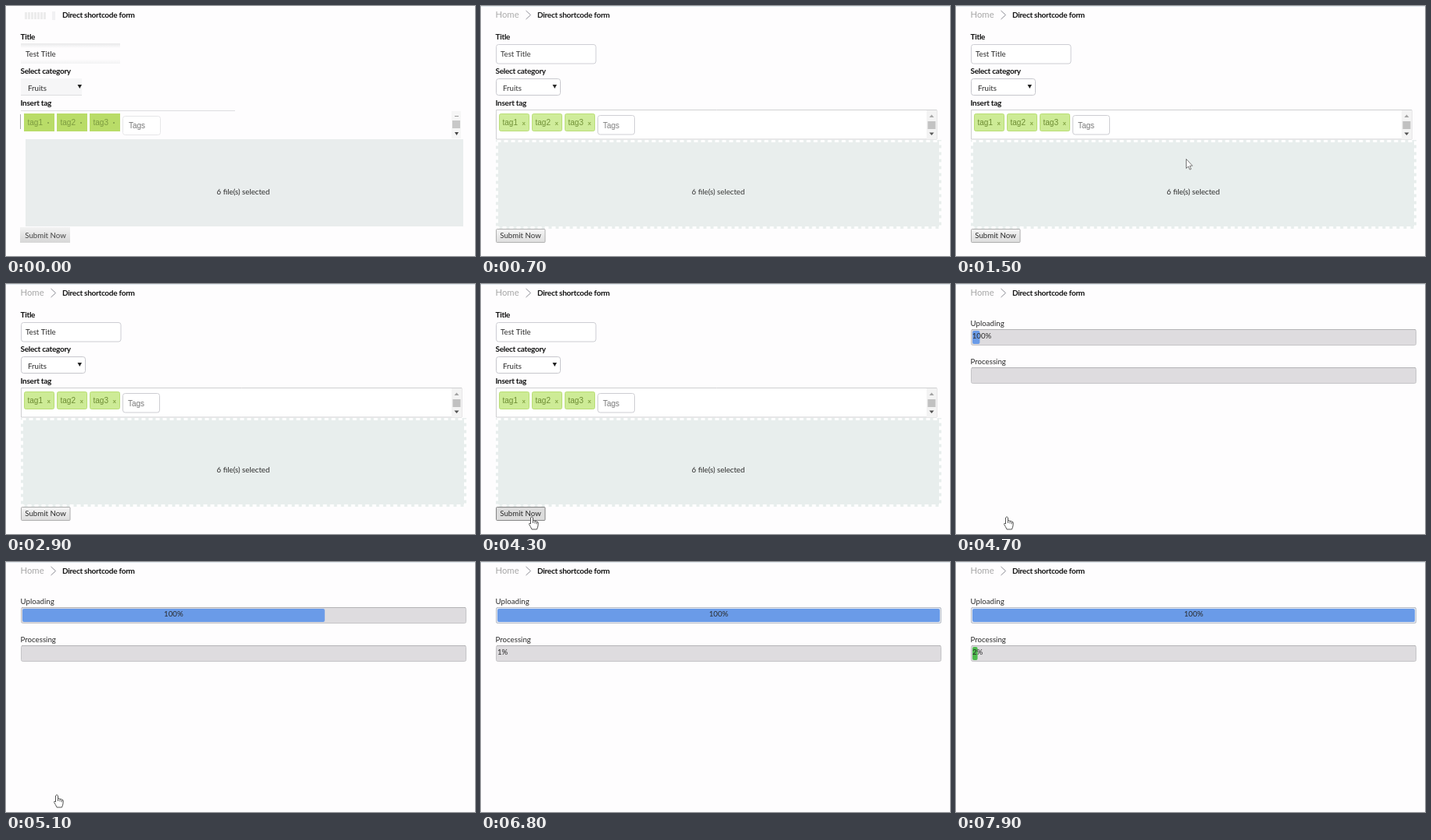
An HTML page with a canvas for the animation above (8 s loop, 600 by 321 pixels).

```html
<!DOCTYPE html>
<html lang="en">
<head>
<meta charset="utf-8">
<title>Upload form</title>
<style>
html, body { margin: 0; width: 100%; height: 100%; overflow: hidden; background: #fefdfe; }
canvas { display: block; width: 600px; height: 321px; }
</style>
</head>
<body>
<canvas id="stage" width="600" height="321"></canvas>
<script>
const ctx = document.getElementById('stage').getContext('2d');
const LOOP = 8000, STEP = 100;
const PAGE = '#fefdfe', INK = '#2a2a2a', ZONE = '#e8eeed';
const BODY = '9.7px Lato, sans-serif';
const BOLD = 'bold 10px Lato, sans-serif';
const FIELD = '10px "Liberation Sans", Arial, sans-serif';

const clamp = v => Math.max(0, Math.min(1, v));
const ramp = (t, from, to) => clamp((t - from) / (to - from));

function text(str, x, y, font = BODY, color = INK, align = 'left') {
  ctx.font = font;
  ctx.letterSpacing = font === BOLD ? '-0.27px' : '0px';
  ctx.fillStyle = color;
  ctx.textAlign = align;
  ctx.fillText(str, x, y);
}

function rect(x, y, w, h, fill) {
  ctx.fillStyle = fill;
  ctx.fillRect(x, y, w, h);
}

function box(x, y, w, h, r, fill, line) {
  ctx.beginPath();
  ctx.roundRect(x + 0.5, y + 0.5, w - 1, h - 1, r);
  ctx.fillStyle = fill;
  ctx.fill();
  if (!line) return;
  ctx.strokeStyle = line;
  ctx.lineWidth = 1;
  ctx.stroke();
}

function poly(points, fill, line) {
  ctx.beginPath();
  points.forEach(([x, y]) => ctx.lineTo(x, y));
  ctx.closePath();
  ctx.fillStyle = fill;
  ctx.fill();
  if (!line) return;
  ctx.strokeStyle = line;
  ctx.lineWidth = 1;
  ctx.stroke();
}

function shade(y, h, top, bottom) {
  const g = ctx.createLinearGradient(0, y, 0, y + h);
  g.addColorStop(0, top);
  g.addColorStop(1, bottom);
  return g;
}

function header() {
  rect(0, 0, 600, 1, '#dfe8ee');
  text('Home', 18.5, 15, '11.3px Lato, sans-serif', '#a6a6a6');
  ctx.strokeStyle = '#8f8f98';
  ctx.lineWidth = 1;
  ctx.beginPath();
  ctx.moveTo(57.5, 6);
  ctx.lineTo(63.5, 11.5);
  ctx.lineTo(57.5, 17);
  ctx.stroke();
  text('Direct shortcode form', 72, 15, BOLD, '#111');
}

function labels() {
  text('Title', 18.5, 42.5, BOLD, '#111');
  text('Select category', 18.5, 86.5, BOLD, '#111');
  text('Insert tag', 18.5, 127.5, BOLD, '#111');
  text('Test Title', 25, 64.5);
  text('Fruits', 28, 109);
  poly([[91.5, 101], [97, 101], [94.3, 106]], '#222');
}

function dropZone() {
  rect(19, 172, 570, 114, ZONE);
  ctx.strokeStyle = '#fff';
  ctx.lineWidth = 3;
  ctx.setLineDash([5, 4]);
  ctx.strokeRect(20.5, 173.5, 567, 111);
  ctx.setLineDash([]);
}

function scrollbar() {
  rect(570, 134, 13, 37, '#f3f3f3');
  poly([[573.5, 143], [579.5, 143], [576.5, 139.5]], '#a3a3a3');
  rect(571.5, 148, 10, 10, '#c1c1c1');
  poly([[573.5, 162.5], [579.5, 162.5], [576.5, 166]], '#505050');
}

function form(dy, pressed) {
  ctx.save();
  ctx.translate(0, dy);
  box(19, 49, 128.5, 25.5, 3, '#fff', '#cdcdd3');
  box(19, 93, 83, 22, 3, '#fff', '#c6c6cc');
  labels();
  box(19, 133, 564.5, 38.5, 0, '#fff', '#cfcfd1');
  scrollbar();
  for (let i = 0; i < 3; i++) {
    const x = 23 + i * 42;
    box(x, 138, 39, 23, 2, '#cdeb96', '#b9de75');
    text('tag' + (i + 1), x + 4.5, 152.5, FIELD, '#6d8c33');
    text('x', x + 29.5, 152.5, 'bold 8px "Liberation Sans", Arial, sans-serif', '#86a647');
  }
  box(149, 140, 48, 25.5, 3, '#fff', '#cdcdd2');
  text('Tags', 156, 156.5, FIELD, '#777');
  dropZone();
  text('6 file(s) selected', 303.5, 242, BODY, INK, 'center');
  box(19, 286, 63.5, 18, 1, pressed ? '#dcdcdc' : shade(286, 18, '#f6f6f6', '#dcdcdc'),
    pressed ? '#858585' : '#adadad');
  text('Submit Now', 50.5, 298, BODY, INK, 'center');
  ctx.restore();
}

// The form before its picture has sharpened.
function roughForm() {
  for (let x = 24; x < 50; x += 4) rect(x, 8, 3, 9, '#ececec');
  rect(59, 7, 4, 11, '#f1f1f3');
  text('Direct shortcode form', 72, 15, BOLD, '#111');
  rect(19, 48, 127, 6, shade(48, 6, '#e9e9ea', PAGE));
  rect(19, 68, 127, 6, shade(68, 6, PAGE, '#f3f3f4'));
  rect(19, 93, 78, 22, '#f6f6f7');
  rect(19, 114, 78, 1, '#dedee0');
  labels();
  rect(19, 134, 274, 1, '#dddde0');
  rect(18, 139, 1, 19, '#aaa');
  for (let i = 0; i < 3; i++) {
    const x = 23 + i * 42;
    rect(x, 138, 39, 23, '#b9dc68');
    text('tag' + (i + 1), x + 4.5, 153, FIELD, '#7c9b40');
    rect(x + 30, 149, 2, 2, '#8dac50');
  }
  box(149, 141, 49, 25, 3, '#fff', '#e6e6e8');
  text('Tags', 157, 157, FIELD, '#777');
  rect(570, 135, 12, 35, '#f6f6f6');
  rect(571, 147, 10, 10, '#c8c8c8');
  rect(574, 141, 5, 1, '#999');
  poly([[574, 162], [579, 162], [576.5, 166]], '#444');
  rect(25, 171, 560, 112, '#e9eded');
  text('6 file(s) selected', 303.5, 242, BODY, INK, 'center');
  rect(18, 284, 64, 20, shade(284, 20, '#f3f3f3', '#d6d6d6'));
  text('Submit Now', 50.5, 298, BODY, '#444', 'center');
}

function track(label, y) {
  text(label, 18.5, y - 4);
  box(19, y, 570, 21, 2, '#dedcdf', '#c5c4c7');
  rect(20, y, 568, 1, '#b4b3b6');
}

function bar(y, width, fill) {
  if (width < 1) return;
  ctx.beginPath();
  ctx.roundRect(21, y, width, 17, Math.min(2, width / 2));
  ctx.fillStyle = fill;
  ctx.fill();
}

function progress(t) {
  track('Uploading', 58);
  track('Processing', 107);
  if (t >= 4700) {
    const w = 566 * ramp(t, 4690, 5290);
    if (w > 564) box(19, 58, 570, 21, 2, '#e6e9f0', '#b9bfca');
    bar(60, w, '#6a9be8');
    text('100%', 21 + Math.max(w, 24) / 2, 70, BODY, INK, 'center');
  }
  if (t >= 5800) {
    bar(109, 5.66 * (ramp(t, 6700, 7300) + ramp(t, 7800, 8400)), '#4dbb4d');
    text(t < 7800 ? '1%' : '2%', 21, 119);
  }
}

function arrow(x, y) {
  const shape = [[0, 0], [0, 12], [2.7, 9.5], [4.6, 13.6], [6.3, 12.8], [4.5, 8.9], [8, 8.6]];
  poly(shape.map(([a, b]) => [x + a, y + b]), '#fff', '#777');
}

function hand(x, y) {
  ctx.save();
  ctx.translate(x, y);
  ctx.beginPath();
  ctx.moveTo(-1.5, 9);
  ctx.lineTo(-1.5, 1);
  ctx.quadraticCurveTo(0, -1.5, 1.5, 1);
  ctx.lineTo(1.5, 5);
  ctx.quadraticCurveTo(3, 3.8, 4, 5.5);
  ctx.quadraticCurveTo(5.7, 4.5, 6.3, 6.3);
  ctx.quadraticCurveTo(8.3, 5.8, 8.3, 8);
  ctx.quadraticCurveTo(8.3, 12, 6.5, 16);
  ctx.lineTo(0, 16);
  ctx.quadraticCurveTo(-1.5, 12.5, -3.5, 9.5);
  ctx.quadraticCurveTo(-3.5, 7, -1.5, 9);
  ctx.closePath();
  ctx.fillStyle = '#fff';
  ctx.fill();
  ctx.strokeStyle = '#555';
  ctx.lineWidth = 1;
  ctx.stroke();
  ctx.beginPath();
  for (const [px, py] of [[1.5, 5], [4, 5.5], [6.3, 6.3]]) {
    ctx.moveTo(px, py);
    ctx.lineTo(px, py + 3);
  }
  ctx.stroke();
  ctx.restore();
}

// Pointer stops: time, x, y.
const PATH = [
  [1000, 318, 236], [1500, 294.5, 196.5], [1900, 272, 212], [2700, 112, 300],
  [2850, 90, 325], [3000, 80, 322], [3400, 65, 299], [6400, 65, 299]
];

function pointer(t) {
  const i = PATH.findIndex(p => t < p[0]);
  if (i < 1) return;
  const [t0, x0, y0] = PATH[i - 1], [t1, x1, y1] = PATH[i];
  const k = ramp(t, t0, t1);
  const x = x0 + (x1 - x0) * k, y = y0 + (y1 - y0) * k;
  (t < 3300 ? arrow : hand)(x, y);
}

function draw(t) {
  ctx.globalAlpha = 1;
  rect(0, 0, 600, 321, PAGE);
  if (t < 900) {
    roughForm();
    ctx.globalAlpha = 1 - (1 - t / 900) ** 2;
    if (t > 0) rect(0, 0, 600, 321, PAGE);
  }
  if (ctx.globalAlpha > 0) header();
  if (t < 4500) {
    form(0, t >= 4300);
  } else {
    progress(t);
    if (t < 4600) form(97, false);
  }
  ctx.globalAlpha = 1;
  pointer(t);
}

const start = performance.now();
function tick() {
  const t = (performance.now() - start) % LOOP;
  draw(Math.floor(t / STEP) * STEP);
  requestAnimationFrame(tick);
}
tick();
</script>
</body>
</html>
```
